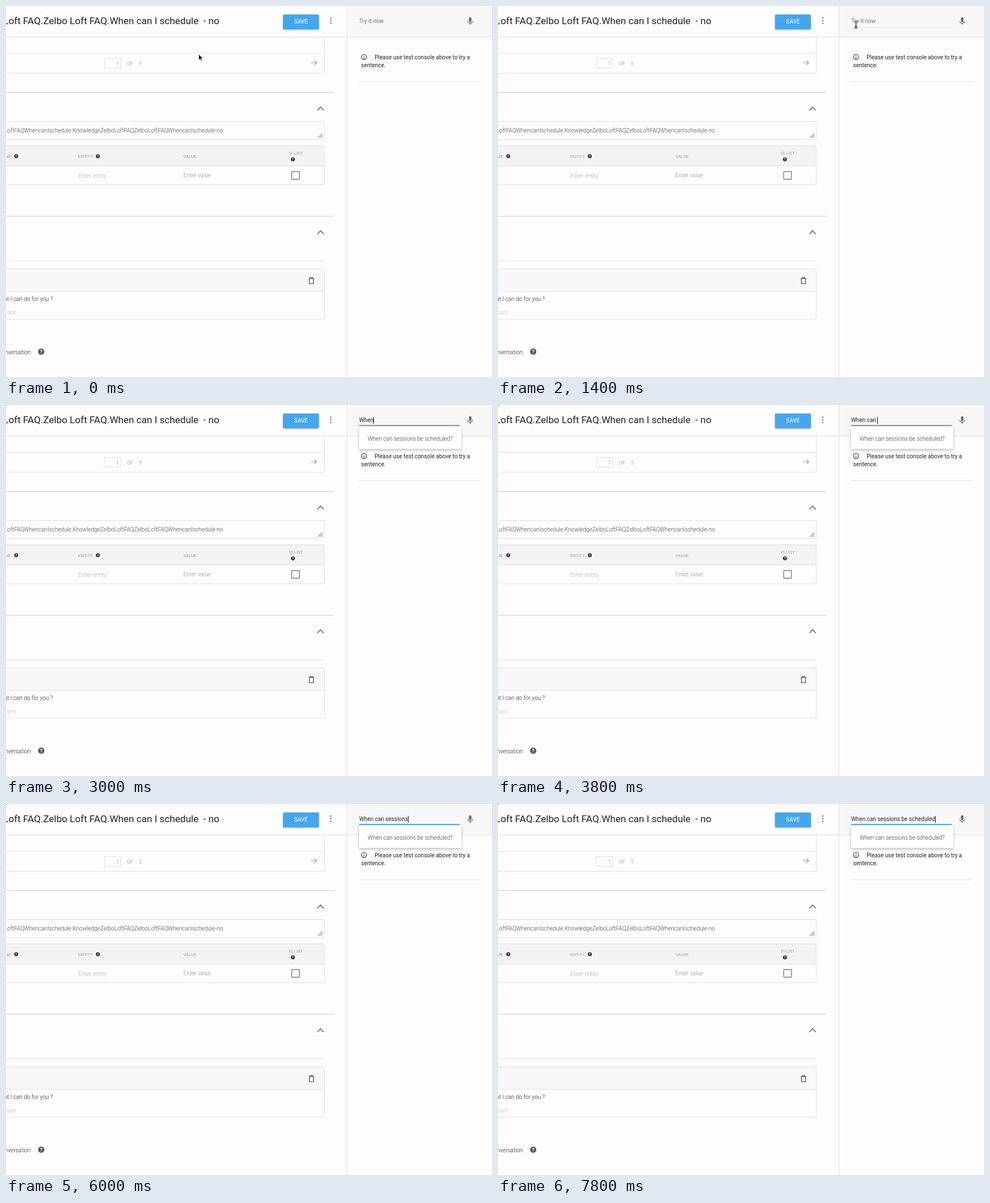
These frames come from a looping animation (856x654 px, 8000 ms). An HTML page:

```html
<!DOCTYPE html>
<html lang="en">
<head>
<meta charset="utf-8">
<title>Test console</title>
<style>
html, body { margin: 0; width: 100%; height: 100%; overflow: hidden; background: #fdfdfd; }
svg { position: absolute; left: 0; top: 0; display: block; }
text, #typed { font: 400 10px Roboto, Arial, sans-serif; white-space: pre; }
.light { font-weight: 300; }
.cap { font-weight: 300; font-size: 7.86px; fill: #777; }
.end { text-anchor: end; }
.rule { fill: none; stroke: #dedede; }
.icon { fill: none; stroke: #666; stroke-width: 1.6; }
.mark { fill: #fff; font-weight: 700; text-anchor: middle; }
#menu rect { fill: #fff; filter: drop-shadow(0 2px 2.5px rgba(0,0,0,.27)); }
#typed {
  position: absolute; left: 622px; top: 21px; height: 12px; line-height: 12px;
  color: #222; border-right: 1px solid #111;
}
</style>
</head>
<body>
<svg width="856" height="654" viewBox="0 0 856 654">
  <defs>
    <g id="help"><circle r="5.5"/><text class="mark" y="3.2" style="font-size:9px">?</text></g>
  </defs>

  <!-- header -->
  <rect x="601" width="255" height="54" fill="#f8f8f8"/>
  <path class="rule" d="M0 54.5H856M600.5 0V654"/>
  <text class="end" x="375.7" y="32" fill="#212121" style="font-size:17.1px">Knowledge.Zelbo Loft FAQ.Zelbo Loft FAQ.When can I schedule  - no</text>
  <rect x="488" y="15" width="63" height="26" rx="1.5" fill="#45a6ed" style="filter:drop-shadow(0 1px 1.5px rgba(0,0,0,.35))"/>
  <text x="519.5" y="31.4" fill="#fff" text-anchor="middle">SAVE</text>
  <g fill="#888"><circle cx="572" cy="21.3" r="1.4"/><circle cx="572" cy="26" r="1.4"/><circle cx="572" cy="30.7" r="1.4"/></g>

  <!-- pager -->
  <path class="rule" d="M0 83.5H560.5M560.5 55V118.5H0M173.5 92.5h29v17h-29z"/>
  <g fill="#888" class="light">
    <text class="light" x="193.5" y="104.5" style="font-size:9px">1</text>
    <text class="light" x="213" y="104.5" style="font-size:9px">OF</text>
    <text class="light" x="234" y="104.5" style="font-size:9px">5</text>
  </g>
  <path class="icon" d="M537 100H547M543 95.8L547.2 100L543 104.2" style="stroke:#999;stroke-width:1.2"/>

  <!-- parameters -->
  <path class="rule" d="M0 152.5H578M0 370.5H578" style="stroke:#c9c9c9"/>
  <path class="icon" d="M548.3 184L554 178.2L559.7 184M548.3 402L554 396.2L559.7 402"/>
  <path class="rule" d="M0 203.5H560.5V235.5H0"/>
  <text class="light end" x="382.2" y="223.3" fill="#444">ZelboLoftFAQZelboLoftFAQWhencanIschedule.KnowledgeZelboLoftFAQZelboLoftFAQWhencanIschedule-no</text>
  <path class="icon" d="M549 232.5L557.5 224M552 232.5L557.5 227M555 232.5L557.5 230" style="stroke-width:1"/>
  <rect y="247" width="560" height="35" fill="#f3f3f4"/>
  <path class="rule" d="M0 246.5H560.5V315H0M0 282H560"/>
  <text class="cap end" x="9" y="267.8">PARAMETER NAME</text>
  <text class="cap" x="127" y="267.8">ENTITY</text>
  <text class="cap" x="312.5" y="267.8">VALUE</text>
  <text class="cap" x="498.5" y="261.8">IS LIST</text>
  <g fill="#333">
    <use href="#help" transform="translate(18 264.8) scale(.64)"/>
    <use href="#help" transform="translate(161.7 264.8) scale(.64)"/>
    <use href="#help" transform="translate(505.3 270.2) scale(.64)"/>
  </g>
  <text class="light" x="127.5" y="303" fill="#aaa">Enter entity</text>
  <text class="light" x="312.5" y="302.4" fill="#8c8c8c">Enter value</text>
  <rect class="icon" x="503.2" y="291.8" width="13.6" height="13.6" rx=".8" style="stroke-width:1.2"/>

  <!-- responses -->
  <path class="rule" d="M0 449H560.5"/>
  <rect y="464" width="560" height="39" fill="#f8f8f9"/>
  <path class="rule" d="M0 463.5H560.5V552H0M0 503H560"/>
  <path class="icon" d="M533 480.5h10M536 480.3v-1.6h4v1.6M534.4 480.5v9h7.2v-9" style="stroke:#444;stroke-width:1.2"/>
  <text class="light end" x="82.5" y="519.5" fill="#222">Tell me what I can do for you ?</text>
  <text class="light end" x="17.7" y="543.5" fill="#bbb">Enter a text response variant</text>
  <text class="light end" x="43.5" y="613.8" fill="#222">Set this intent as end of conversation</text>
  <use href="#help" transform="translate(62 609.3)" fill="#555"/>

  <!-- console -->
  <text id="hint" x="622" y="30" fill="#707070">Try it now</text>
  <path fill="#666" transform="translate(809 18.3) scale(.714)" d="M12 14c1.66 0 3-1.34 3-3V5c0-1.66-1.34-3-3-3S9 3.34 9 5v6c0 1.66 1.34 3 3 3zm5.3-3c0 3-2.54 5.1-5.3 5.1S6.7 14 6.7 11H5c0 3.41 2.72 6.23 6 6.72V21h2v-3.28c3.28-.48 6-3.3 6-6.72z"/>
  <circle class="icon" cx="630.5" cy="89.8" r="4.6" style="stroke:#222;stroke-width:1.1"/>
  <path d="M630.5 87v1.1M630.5 89.2v3.2" stroke="#222" stroke-width="1.1"/>
  <text x="649.3" y="94" fill="#222">Please use test console above to try a</text>
  <text x="625.5" y="108.3" fill="#222">sentence.</text>
  <path class="rule" d="M622 133.5H835.5"/>
  <path id="hover" d="M622 37.5H799" stroke="#ccc" stroke-dasharray="1 1"/>
  <g id="menu">
    <rect x="622" y="39" width="180" height="38.5" rx="1"/>
    <text class="light" x="637" y="62.7" fill="#333">When can sessions be scheduled?</text>
    <path d="M622 36.2H799" stroke="#3c98d8" stroke-width="1.8"/>
  </g>
  <rect id="speck" width="1.5" height="1" fill="#555"/>

  <!-- pointers -->
  <path id="arrow" d="M0 0V10.4L2.4 8.2L4 12L5.7 11.2L4.1 7.6H7.2Z" fill="#000" stroke="#fff" stroke-width=".7"/>
  <g id="beam" fill="none">
    <path d="M-3 -6Q0 -6 0 -4V4Q0 6 -3 6M3 -6Q0 -6 0 -4V4Q0 6 3 6M-1.8 2.4H1.8" stroke="#fff" stroke-width="2.2"/>
    <path d="M-3 -6Q0 -6 0 -4V4Q0 6 -3 6M3 -6Q0 -6 0 -4V4Q0 6 3 6M-1.8 2.4H1.8" stroke="#111" stroke-width="1.1"/>
  </g>
</svg>
<div id="typed"></div>

<script>
const LOOP = 8000, STEP = 200;
const PHRASE = "When can sessions be scheduled";
const get = id => document.getElementById(id);
const [hint, hover, menu, speck, arrow, beam, typed] =
  ["hint", "hover", "menu", "speck", "arrow", "beam", "typed"].map(get);

// [time, x, y] of the pointer
const path = [[0, 339.5, 85], [200, 365, 81], [400, 440, 66], [600, 530, 46],
  [800, 600, 36], [1000, 628, 33], [1200, 630.5, 33], [2000, 630.5, 34]];
// [time, letters typed]
const keys = [[0, 0], [2400, 1], [2600, 2], [2800, 3], [3000, 4], [3200, 5], [3400, 6],
  [3600, 7], [3800, 9], [5000, 10], [5200, 11], [5400, 13], [5600, 14], [5800, 15],
  [6000, 17], [6200, 18], [6400, 20], [6600, 22], [6800, 24], [7000, 25], [7200, 26],
  [7400, 27], [7600, 29], [7800, 30]];

const at = (table, t) => table.findLast(row => row[0] <= t);
const show = (el, on) => { el.style.visibility = on ? "visible" : "hidden"; };

function draw(now) {
  const t = Math.floor(now % LOOP / STEP) * STEP;
  const [, x, y] = at(path, t);
  const typing = t >= 2400, focused = t >= 1800, overField = t >= 1000;

  for (const el of [arrow, beam]) el.setAttribute("transform", `translate(${x} ${y})`);
  show(arrow, !overField);
  show(beam, overField && !typing);
  show(hover, overField && !focused);
  show(menu, focused);
  show(hint, !typing);
  show(speck, typing);
  show(typed, typing);

  typed.textContent = PHRASE.slice(0, at(keys, t)[1]);
  const caretOff = t >= 4200 && t < 4600;
  typed.style.borderRightColor = caretOff ? "transparent" : "#111";
}

function tick(now) {
  draw(now - start);
  requestAnimationFrame(tick);
}
const start = performance.now();
draw(0);
requestAnimationFrame(now => tick(Math.max(now, start)));
</script>
</body>
</html>
```
